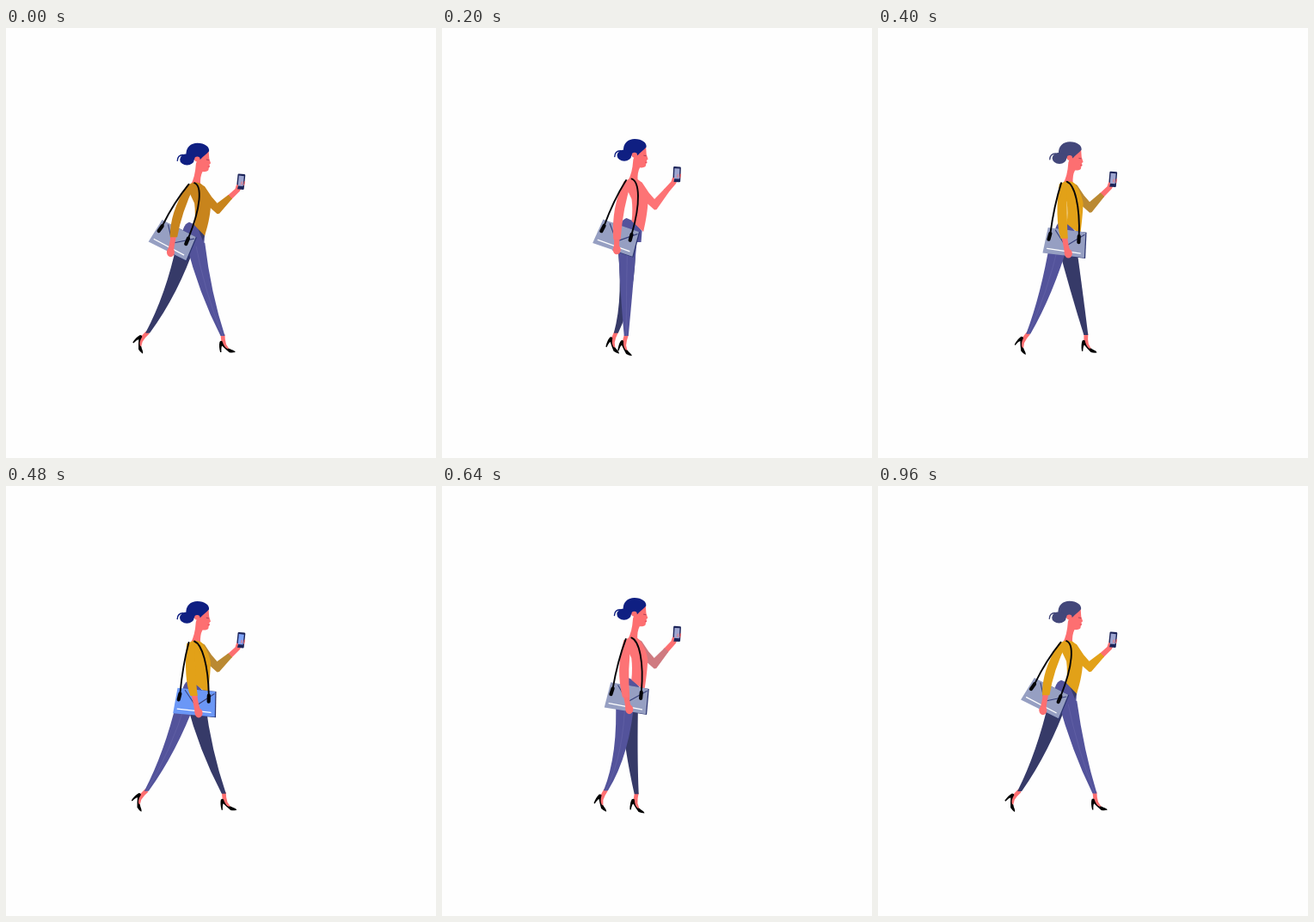
These frames come from a looping animation (500 px wide and 500 px high, 1 s). An HTML page:

```html
<!DOCTYPE html>
<html lang="en">
<head>
<meta charset="utf-8">
<title>Walking with a phone</title>
<style>
html, body { margin: 0; width: 100%; height: 100%; overflow: hidden; background: #fefefe; }
svg { display: block; width: 100vw; height: 100vh; }
.skin { fill: #fd6f71; }
</style>
</head>
<body>
<svg viewBox="0 0 500 500" stroke-linecap="round" stroke-linejoin="round">
  <defs>
    <g id="foot">
      <path class="skin" d="M-1.4 -1H3.4Q3.4 6 5 11L9 17L4 16L0 11Q-1 7 -1.4 -1Z"/>
      <path d="M-2.6 8Q-1 6.2 .4 7.4Q2.4 14.2 6.4 16.2Q8.5 15.2 10.5 17Q15 18.4 15.6 20.2Q12 21 8.6 20.4Q4.5 17 .2 12.6Q-1 14 -.7 20H-2Q-3.8 13 -2.6 8Z"/>
    </g>
  </defs>
  <g id="farFoot"><use href="#foot"/></g>
  <path id="farLeg" fill="#363a68"/>
  <g id="nearFoot"><use href="#foot"/></g>
  <path id="nearLeg" fill="#53539b"/>
  <path id="seam" fill="none" stroke="#7270b0" stroke-width=".4"/>
  <g class="body">
    <path fill="#53539b" d="M203 254Q204 228 213 226L222 230L231 241L230 254Z"/>
    <path id="shade" fill="#363a68" d="M223 233L231 240L229 248Z"/>
  </g>
  <path id="farHand" class="skin"/>
  <path id="sleeve"/>
  <g id="phone">
    <rect x="-4.4" y="-9" width="8.8" height="18" rx="1.2" fill="#1c2459"/>
    <rect id="screen" x="-3" y="-6.9" width="6" height="12"/>
    <path class="skin" d="M-4.6 3.5L-2.6 4.5L-3.2 9L-5 9.5ZM3.8 -1L5 -.5L4.4 4L3.4 4Z"/>
    <path fill="#e8808c" d="M-.2 .5L2.3 -1L2.5 3L.2 4Z" opacity=".6"/>
  </g>
  <g class="body">
    <path class="skin" d="M235.5 142.5L236.2 152L238 157.6L236.3 159L236.9 161.4L235.7 163L235.4 165.4Q234 167.8 228.5 167.4Q225.4 173 226 183L214.5 183Q219.8 174 220.8 158L224 149Z"/>
    <g id="hair">
      <path d="M209.5 148.5C208.5 139 215 134 222.5 134C231 134 237 138.5 236 143.5C233 147 229 149.5 226 153C220 154.5 213 153 209.5 148.5Z"/>
      <ellipse cx="210.4" cy="153.2" rx="8.3" ry="6.6"/>
    </g>
    <path id="curl" fill="none" stroke-width="1.4" d="M206 147.8Q199.5 148 199.2 154.6"/>
    <ellipse class="skin" cx="222.3" cy="152.8" rx="3.2" ry="2.9"/>
    <path fill="none" stroke="#8d2f4d" stroke-width=".7" d="M233.2 153.3L235.6 153.8"/>
    <path fill="none" stroke="#dc3f55" stroke-width=".7" d="M235 161.4H236.4"/>
  </g>
  <path id="torso"/>
  <g id="bag">
    <path fill="#2b3470" d="M-10 -15H23.2L25.6 15.2L0 15.2Z"/>
    <path id="bagFace" d="M-22 -15H22L24.3 14.6L-24.5 15Z"/>
    <path fill="none" stroke="#39427c" stroke-width="1.1" d="M-13 -13L1 4L21 -12"/>
    <path fill="none" stroke="#fff" stroke-width="1.3" d="M-20 9.4L19 10"/>
  </g>
  <path id="forearm" class="skin"/>
  <ellipse id="hand" class="skin" rx="4.5" ry="5.4"/>
  <path id="arm"/>
  <path id="straps" fill="none" stroke="#050508" stroke-width="1.9"/>
  <path id="tabs" fill="none" stroke="#050508" stroke-width="4.2"/>
</svg>
<script>
const $ = id => document.getElementById(id);
const LOOP = 1000, STEP = 40, LEAD = 20;
const { PI, sin, cos, asin, abs, max, min } = Math;

const set = (id, attrs) => {
  for (const k in attrs) $(id).setAttribute(k, attrs[k]);
};
const pt = p => p.map(n => n.toFixed(2)).join(" ");
const poly = pts => "M" + pts.map(pt).join("L") + "Z";
// Control point that makes a quadratic curve pass through q halfway
const through = (p, q, r) => q.map((v, i) => 2 * v - (p[i] + r[i]) / 2);

// Tapered limb whose sides bend through the middle joint
function limb(a, b, c, wa, wb, wc) {
  const side = k => {
    const [p, q, r] = [[a, wa], [b, wb], [c, wc]].map(([j, w]) => [j[0] + k * w, j[1]]);
    return [p, through(p, q, r), r];
  };
  const l = side(-1), r = side(1);
  return `M${pt(l[0])}Q${pt(l[1])} ${pt(l[2])}L${pt(r[2])}Q${pt(r[1])} ${pt(r[0])}Z`;
}

// Feet sweep at nearly constant speed; the knee bends while swinging forward
function drawLeg(name, phase, lift) {
  const k = .985, stride = asin(k * cos(phase)) / asin(k);
  const reach = 45 * stride;
  const hip = [215 + .12 * reach, 250 - 5 * lift];
  const ankle = [208.3 + reach, 356.3 + 2 * cos(phase - .75)];
  const knee = [211.6 + .56 * reach - 2.5 * stride + 5 * max(0, -sin(phase)), 306];
  const turn = 24 - 25 * stride;
  set(name + "Leg", { d: limb(hip, knee, ankle, 11, 6.9, 2.5) });
  set(name + "Foot", { transform: `translate(${ankle[0] - 1} ${ankle[1] - 1}) rotate(${turn})` });
  return `M${pt(hip)}Q${pt(through(hip, knee, ankle))} ${pt(ankle)}`;
}

// Colours flip twice per loop, once for each step taken
function paint(t) {
  const step = t % 500;
  const pink = step >= 70 && step < 310;
  const faded = step >= 250 && step < 470;
  const dim = t >= 400 && t < 720;
  const bright = t >= 440 && t < 560;
  const gold = t < 100 ? "#c8841c" : "#e2a118";
  const shirt = pink ? "#fd7375" : gold;
  const hair = faded ? "#43477a" : "#0f1f82";
  set("torso", { fill: shirt });
  set("arm", { fill: shirt });
  set("sleeve", { fill: !dim ? shirt : pink ? "#cf7a80" : "#ba8932" });
  set("hair", { fill: hair });
  set("curl", { stroke: hair });
  set("bagFace", { fill: bright ? "#6b97f6" : "#969fc2" });
  set("screen", { fill: bright ? "#7fa4f8" : "#9da5d0" });
}

function draw(t) {
  const phase = 2 * PI * (t + LEAD) / LOOP;
  const c = cos(phase), s = sin(phase);
  const lift = abs(s) ** 1.4;
  const dx = 1.6 * lift, dy = -5.2 * lift;
  const shift = `translate(${dx} ${dy})`;
  const body = (x, y) => [x + dx, y + dy];
  const held = (x, y) => [x, y - 9.2 * lift];
  const cuff = (x, y) => [x + dx * .3, y - 8 * lift];

  paint(t);
  document.querySelectorAll(".body").forEach(g => g.setAttribute("transform", shift));
  drawLeg("far", phase + PI, lift);
  set("seam", { d: drawLeg("near", phase, lift) });

  // Torso, far arm and phone
  set("shade", { opacity: max(0, min(1, 3 * c - 2)) });
  set("torso", {
    d: `M215 181Q220 178.5 226 181C231 184 237.5 198 238 206C237.5 219 ${235 - c} 232 ${233 - 2 * c} 242L219 229.5Q220.5 216 219 204L211 187Q212 182 215 181Z`,
    transform: shift
  });
  set("sleeve", {
    d: poly([body(225, 181), body(231, 184.5), body(239, 196.5), body(245.5, 204),
      cuff(258.5, 194.5), cuff(263, 199), body(248, 216), body(245.5, 216.5), body(235.5, 207.5)])
  });
  set("farHand", {
    d: poly([cuff(257, 196), held(266.5, 187.5), held(268, 183), held(274, 185),
      held(272, 190), cuff(262, 200)])
  });
  set("phone", { transform: `translate(${pt(held(273.1, 179.2))}) rotate(${6 - 3.5 * lift})` });

  // Bag and near arm swing together
  const bag = [207.2 - 12.8 * c - 1.6 * s, 249.1 - 2.6 * c - 4.7 * lift];
  const tilt = 16.25 + 10.75 * c + s;
  const elbow = [208 - 7 * c, 216.5 - 2.5 * c - 6.5 * lift];
  const wrist = [206.8 - 11.8 * c - 1.2 * s, 243.5 - .5 * c + 2.5 * lift];
  const hand = [207.3 - 16.3 * c - 1.5 * s, 262.5 - 1.5 * c - 4.5 * lift];
  set("bag", { transform: `translate(${bag}) rotate(${tilt})` });
  set("arm", { d: limb(body(214.7, 183), elbow, wrist, 4.5, 5.6, 4.2) });
  set("forearm", {
    d: limb([wrist[0], wrist[1] - 3], wrist.map((v, i) => (v + hand[i]) / 2), hand, 3.5, 3.1, 4)
  });
  set("hand", { cx: hand[0] + .5, cy: hand[1] });

  // Straps
  const a = tilt * PI / 180;
  const onBag = (x, y) => [bag[0] + x * cos(a) - y * sin(a), bag[1] + x * sin(a) + y * cos(a)];
  const left = onBag(-18.5, -8.5), right = onBag(15, -9.5);
  const from = body(212.5, 182), over = body(219, 180.5);
  const mid = [(from[0] + left[0]) / 2 - 2, (from[1] + left[1]) / 2 - 3];
  const bend = [227 + (right[0] - 212.5) * .35 + dx, 208 + dy];
  set("straps", {
    d: `M${pt(from)}Q${pt(mid)} ${pt(left)}M${pt(over)}C${pt(body(228, 184))} ${pt(bend)} ${pt(right)}`
  });
  set("tabs", { d: `M${pt(left)}L${pt(onBag(-19.5, -1.5))}M${pt(right)}L${pt(onBag(15.5, -2.5))}` });
}

const start = performance.now();
function tick() {
  const t = (performance.now() - start) % LOOP;
  draw(Math.floor(t / STEP) * STEP);
  requestAnimationFrame(tick);
}
tick();
</script>
</body>
</html>
```
